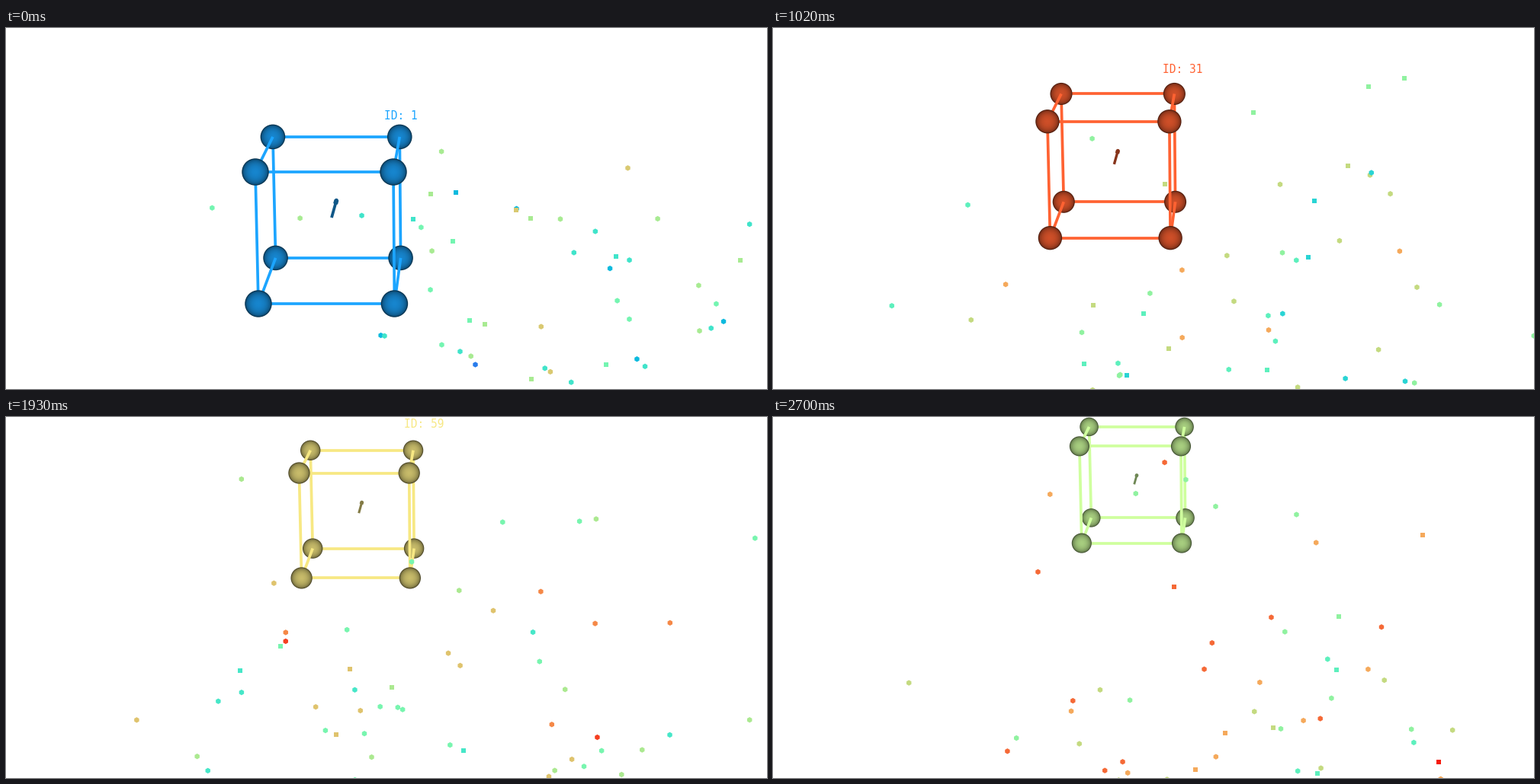
These frames come from a looping animation (998x474 px, 2770 ms). A matplotlib script:

```python
import numpy as np
import matplotlib.pyplot as plt
from matplotlib.animation import FuncAnimation
from matplotlib.collections import LineCollection

W, H, DPI = 998, 474, 64
PX = 72 / DPI                       # points per pixel
TICK, LOOP = 10, 2770               # ms
STARTS = np.cumsum([0, 130, 60] + [70] * 7 + [60] + [70] * 28)

VANISH = np.array([610, -380])
RATE = .00439                       # retreat per id, for the front face
BACK = .919                         # size of the back face against the front
LEFT, RIGHT, TOP, BOTTOM = -283, -102, 569, 742
TAPER = .986                        # the bottom is a little narrower

HUE_IDS = [1, 21, 31, 46, 59, 68, 83]
HUES = [.20, .55, .885, .39, .69, .69, .62]

rainbow = plt.get_cmap('rainbow')
RINGS = np.linspace(1, .07, 14)
SHADE = .32 + .49 * np.sqrt(1 - RINGS ** 2)


def tint(hue, gain):
    return np.clip(np.asarray(rainbow(hue))[..., :3] * gain, 0, 1)


def shrink(n, depth=1.0):
    return 1 / (1 + RATE * depth * n)


def face(n, depth):
    """Corners of one cube face, clockwise, and its size."""
    size = depth * shrink(n, depth)
    corners = [(LEFT, TOP), (RIGHT, TOP),
               (RIGHT * TAPER, BOTTOM), (LEFT * TAPER, BOTTOM)]
    return VANISH + size * np.array(corners), size


def loop_edges(p):
    return list(zip(p, np.roll(p, -1, axis=0)))


def arrow_shape(n):
    scale = shrink(n, .934)
    middle = VANISH + scale * np.array([-179.5, 616.5])
    along = np.array([7, -25]) * scale ** 2
    side = np.array([.96, .27]) * scale
    profile = [(-.5, 1.9), (.2, 1.9), (.24, 3.1), (.42, 3), (.5, 1.2)]
    outline = [(a, -w) for a, w in profile] + profile[::-1]
    return [middle + along * a + side * w for a, w in outline]


def cloud(n, rng):
    count = rng.randint(46, 57)
    x = rng.normal(615, 205, count)
    x = np.where((x < 120) | (x > 1000), rng.uniform(380, 990, count), x)
    y = 40 + 438 * rng.rand(count) ** .46
    low = .17 + .002 * n
    hue = low + .63 * np.round(rng.beta(1.9, 1.9, count) * 6) / 6
    return np.column_stack([x, y]), tint(hue, .96)


fig = plt.figure(figsize=(W / DPI, H / DPI), dpi=DPI, facecolor='white')
ax = fig.add_axes([0, 0, 1, 1])
ax.set_xlim(0, W)
ax.set_ylim(H, 0)
ax.axis('off')


def edge_set(z):
    lines = LineCollection([], linewidths=3.7 * PX, zorder=z, capstyle='butt')
    return ax.add_collection(lines, autolim=False)


def dot_set(z, marker='o', size=6.6):
    return ax.scatter([], [], marker=marker, s=(size * PX) ** 2,
                      linewidths=0, zorder=z)


back_edges, back_balls = edge_set(1), dot_set(2)
front_edges, front_balls = edge_set(3), dot_set(4)
arrow, = ax.fill([0, 0, 0], [0, 0, 0], lw=0, zorder=5)
round_dots, square_dots = dot_set(6, 'h', 7.4), dot_set(6, 's', 6)
label = ax.text(0, 0, '', family='DejaVu Sans Mono', size=14.5 * PX,
                ha='left', va='center_baseline', zorder=7)


def set_balls(balls, centres, size, color):
    """Shade each ball with rings that brighten towards its middle."""
    diameters = 35.5 * size * RINGS * PX
    balls.set_offsets(np.repeat(centres, len(RINGS), axis=0))
    balls.set_sizes(np.tile(diameters ** 2, len(centres)))
    balls.set_facecolor(np.tile(SHADE[:, None] * color, (len(centres), 1)))


def draw(tick):
    step = np.searchsorted(STARTS, tick * TICK, side='right') - 1
    n = int(2.14 * step + .9)
    rng = np.random.RandomState(101 + n)
    color = tint(np.interp(n + 1, HUE_IDS, HUES), 1.1)

    back, back_size = face(n, BACK)
    front, front_size = face(n, 1)
    back_edges.set_segments(loop_edges(back))
    front_edges.set_segments(list(zip(back, front)) + loop_edges(front))
    for edges in (back_edges, front_edges):
        edges.set_color(color)
    set_balls(back_balls, back, back_size, color)
    set_balls(front_balls, front, front_size, color)

    arrow.set_xy(arrow_shape(n))
    arrow.set_facecolor(color * .53)

    label.set_position(VANISH + (7, 0) + shrink(n, 1.07) * np.array([-121, 494]))
    label.set_text(f'ID: {n + 1}')
    label.set_color(color)

    points, colors = cloud(n, rng)
    square = rng.rand(len(points)) < .25
    for dots, chosen in ((round_dots, ~square), (square_dots, square)):
        dots.set_offsets(points[chosen])
        dots.set_facecolor(colors[chosen])
    return []


anim = FuncAnimation(fig, draw, frames=LOOP // TICK, interval=TICK,
                     init_func=lambda: draw(0), repeat=True,
                     cache_frame_data=False)
plt.show()
```
